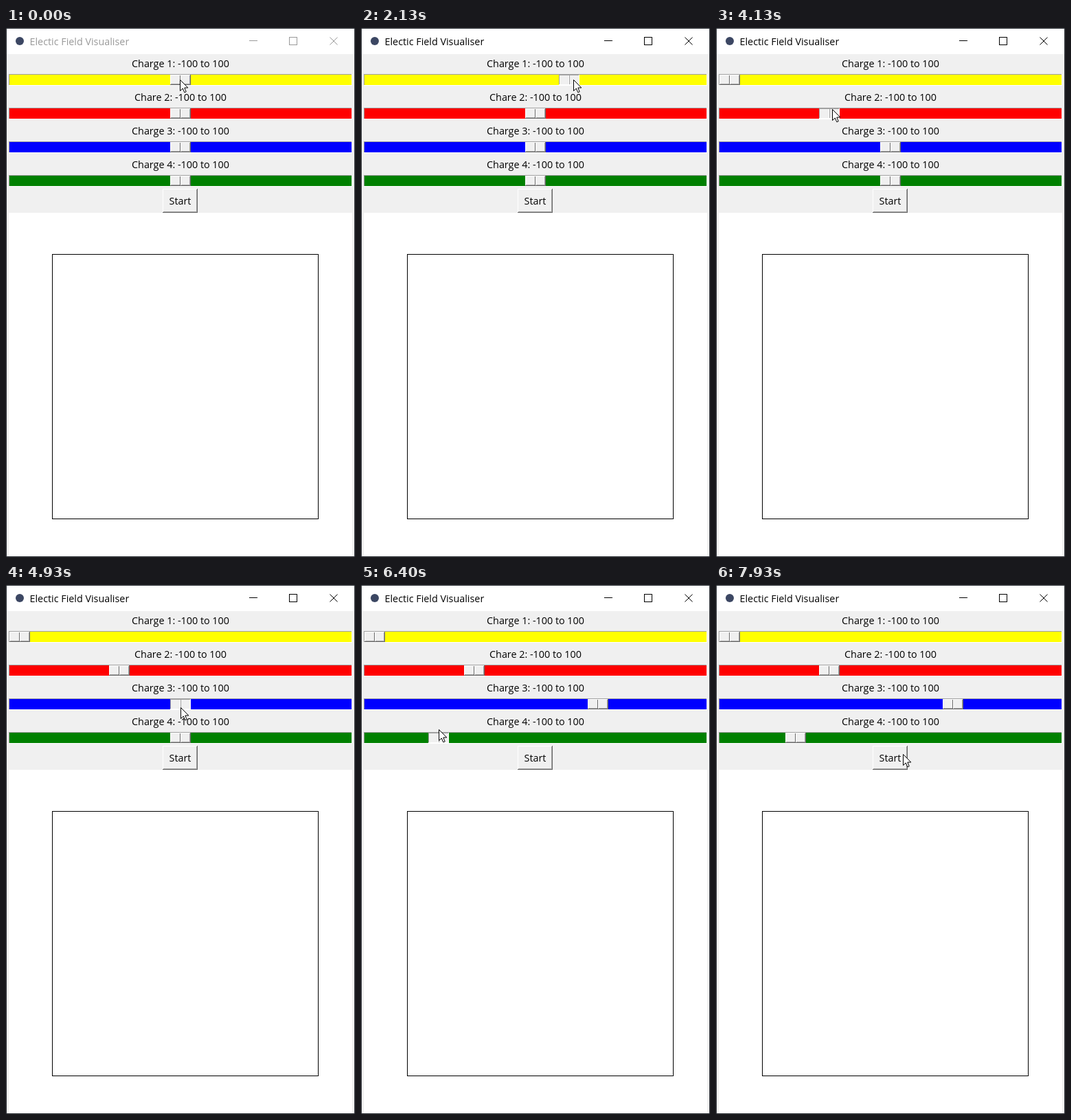
These frames come from a looping animation (508 px wide and 770 px high, 8 s). An HTML page:

```html
<!DOCTYPE html>
<html lang="en">
<head>
<meta charset="utf-8">
<title>Electic Field Visualiser</title>
<style>
  html, body { margin: 0; width: 100%; height: 100%; overflow: hidden; background: #fff; }
  svg { display: block; width: 508px; height: 770px; }
  text { font: 14.35px "Open Sans", "Noto Sans", sans-serif; fill: #000; }
  .mid { text-anchor: middle; }
</style>
</head>
<body>
<svg id="stage" viewBox="0 0 508 770" xmlns="http://www.w3.org/2000/svg"></svg>
<script>
const STEP = 1000 / 15, STEPS = 120;
const FACE = '#f0f0f0', LIGHT = '#fff', SHADE = '#a0a0a0', DARK = '#696969';
const stage = document.getElementById('stage');

function add(parent, tag, attrs, text) {
  const node = document.createElementNS('http://www.w3.org/2000/svg', tag);
  for (const key in attrs) node.setAttribute(key, attrs[key]);
  if (text) node.textContent = text;
  parent.appendChild(node);
  return node;
}
const box = (parent, x, y, width, height, fill) =>
  add(parent, 'rect', { x, y, width, height, fill });

function raised(parent, w, h) {
  box(parent, 0, 0, w, h, DARK);
  box(parent, 0, 0, w - 1, h - 1, LIGHT);
  box(parent, 1, 1, w - 2, h - 2, SHADE);
  box(parent, 1, 1, w - 3, h - 3, FACE);
}

function sunken(parent, w, h) {
  box(parent, 0, 0, w, h, LIGHT);
  box(parent, 0, 0, w - 1, h - 1, SHADE);
  box(parent, 1, 1, w - 2, h - 2, FACE);
}

// Window frame and title bar
box(stage, 0, 0, 508, 770, '#262a30');
box(stage, 1, 1, 506, 768, FACE);
box(stage, 1, 1, 506, 37, '#fff');
add(stage, 'circle', { cx: 20, cy: 19, r: 6, fill: '#3c4763' });
const title = add(stage, 'text', { x: 34.5, y: 25 }, 'Electic Field Visualiser');
const controls = add(stage, 'g', { fill: 'none' });
add(controls, 'path', { d: 'M354 18.5h12M412.5 13.5h11v11h-11z', 'shape-rendering': 'crispEdges' });
add(controls, 'path', { d: 'M471.5 13.5l11 11m0-11l-11 11' });

// Sliders: dragged positions are [step, x]; held is [from, to)
const sliders = [
  { label: 'Charge 1', color: '#ffff00', held: [2, 44],
    path: [[4, 239], [14, 75], [15, 75], [16, 89], [23, 237], [31, 237], [32, 288], [34, 382], [39, 5]] },
  { label: 'Chare 2', color: '#ff0000', held: [54, 64], path: [[58, 239], [62, 150]] },
  { label: 'Charge 3', color: '#0000ff', held: [74, 82], path: [[77, 239], [81, 330]] },
  { label: 'Charge 4', color: '#008000', held: [90, 98], path: [[90, 239], [95, 94], [97, 101]] },
];
sliders.forEach((s, i) => {
  const y = 67 + 49 * i;
  add(stage, 'text', { x: 254, y: y - 10, class: 'mid' }, s.label + ': -100 to 100');
  box(stage, 4, y, 500, 17, LIGHT);
  box(stage, 4, y, 499, 16, SHADE);
  box(stage, 5, y + 1, 498, 15, s.color);
  s.y = y + 1;
  s.thumb = add(stage, 'g', {});
  s.up = add(s.thumb, 'g', {});
  raised(s.up, 30, 15);
  box(s.up, 14, 1, 1, 13, DARK);
  box(s.up, 15, 1, 1, 13, LIGHT);
  s.down = add(s.thumb, 'g', {});
  sunken(s.down, 30, 15);
  box(s.down, 14, 1, 1, 13, LIGHT);
  box(s.down, 15, 1, 1, 13, SHADE);
});

const button = add(stage, 'g', { transform: 'translate(228 234)' });
raised(button, 51, 35);
add(stage, 'text', { x: 253.5, y: 257, class: 'mid' }, 'Start');

// Drawing area
box(stage, 4, 269, 500, 500, '#fff');
add(stage, 'rect', { x: 67.5, y: 329.5, width: 387, height: 385, fill: 'none', stroke: '#000' });

const pointer = add(stage, 'path', {
  d: 'M.5 .5V16.5L4.3 13L6.8 18.8L9.2 17.8L6.8 12H11.8Z', fill: '#fff', stroke: '#000',
});
// [step, x, y] of the pointer tip
const pointerPath = [
  [4, 253, 75], [14, 91, 60], [15, 91, 60], [16, 105, 58], [23, 254, 69], [31, 254, 69],
  [32, 309, 75], [34, 399, 70], [40, 17, 67], [41, 16, 72], [43, 16, 72],
  [51, 236, 136], [55, 254, 121], [58, 254, 121], [62, 169, 118], [63, 169, 118],
  [69, 294, 176], [74, 254, 178], [77, 254, 178], [81, 359, 172], [86, 254, 225], [89, 254, 225],
  [95, 109, 212], [97, 117, 207], [101, 268, 246], [102, 266, 249], [103, 267, 251],
  [106, 284, 226], [110, 332, 193], [111, 332, 193], [112, 332, 188], [119, 272, 246],
];

// Position on a keyed path, each leg half linear and half smoothed
function along(path, step) {
  const next = path.findIndex(key => key[0] > step);
  if (next === 0) return path[0].slice(1);
  if (next < 0) return path[path.length - 1].slice(1);
  const a = path[next - 1], b = path[next];
  const k = (step - a[0]) / (b[0] - a[0]);
  const eased = (k + k * k * (3 - 2 * k)) / 2;
  return a.slice(1).map((v, i) => Math.round(v + (b[i + 1] - v) * eased));
}

function render(time) {
  const step = Math.floor((time + 4) / STEP) % STEPS;
  const active = step >= 2;
  title.style.fill = active ? '#000' : '#999';
  controls.setAttribute('stroke', active ? '#000' : '#999');
  for (const s of sliders) {
    const held = step >= s.held[0] && step < s.held[1];
    s.thumb.setAttribute('transform', `translate(${along(s.path, step)[0]} ${s.y})`);
    s.up.setAttribute('visibility', held ? 'hidden' : 'visible');
    s.down.setAttribute('visibility', held ? 'visible' : 'hidden');
  }
  pointer.setAttribute('transform', `translate(${along(pointerPath, step).join(' ')})`);
}

const start = performance.now();
function tick() {
  render(performance.now() - start);
  requestAnimationFrame(tick);
}
tick();
</script>
</body>
</html>
```
